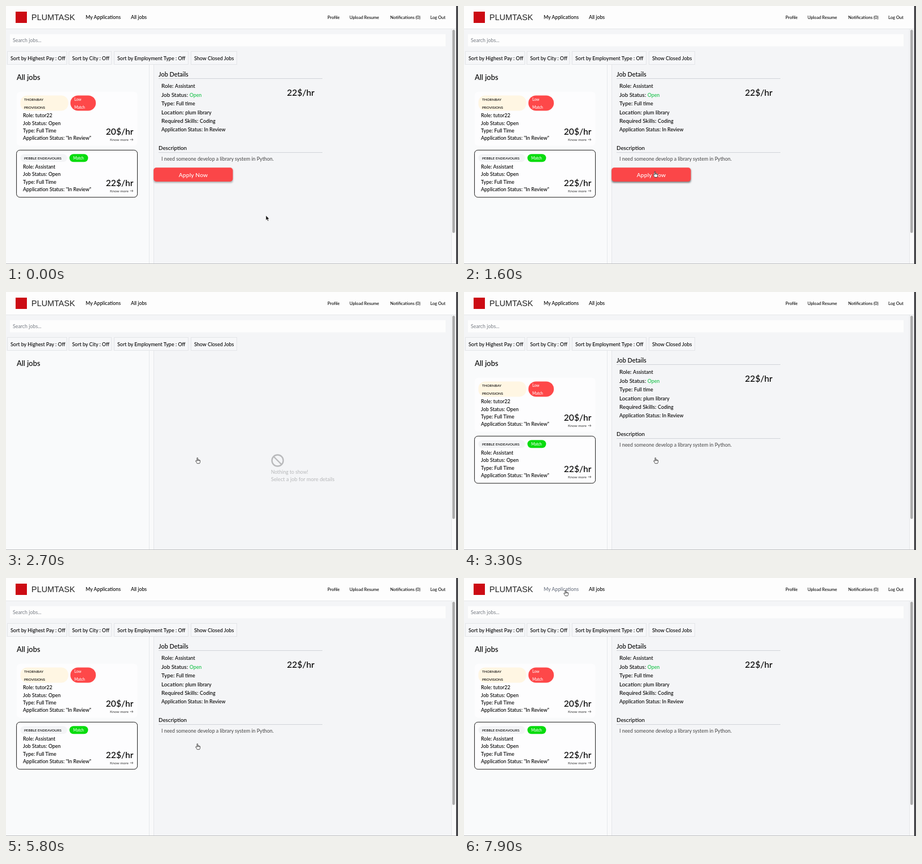
Recreate the animation shown at these times as an HTML page. Size 800x457 px, loop 8000 ms.

```html
<!DOCTYPE html>
<html lang="en">
<head>
<meta charset="utf-8">
<title>Job board</title>
<style>
  html, body { margin: 0; width: 100%; height: 100%; overflow: hidden; background: #f4f5f7; }
  svg { display: block; width: 100%; height: 100%; }
  text { font: 500 8.95px Lato, sans-serif; fill: #000; white-space: pre; }
  .brand { font: 14.5px "Liberation Sans", Arial, sans-serif; fill: #222; }
  .nav text { font-size: 8.75px; }
  .account text { font-size: 7.6px; }
  .title { font-size: 12.9px; }
  .pay { font-size: 15.6px; }
  .tag { font-size: 6.3px; }
  .light { font-size: 6.7px; fill: #fff; }
  .more { font-size: 6.5px; font-weight: 400; fill: #333; }
  .label { font-size: 9.9px; }
  .value { font-size: 8.9px; }
  .apply { font-size: 10.2px; letter-spacing: .2px; fill: #fff; }
  .soft { font-size: 8.85px; font-weight: 400; fill: #444; }
  #empty text { font-weight: 400; fill: #b7b8ba; }
  .rule { stroke: #d1d4d9; }
  .edge { stroke: #e5e7ea; }
</style>
</head>
<body>
<svg viewBox="0 0 800 457" preserveAspectRatio="none">
  <defs>
    <filter id="blur" x="-10%" y="-50%" width="120%" height="200%"><feGaussianBlur stdDeviation="1.6"/></filter>
  </defs>

  <rect width="800" height="457" fill="#f4f5f7"/>
  <rect width="797" height="40" fill="#fdfdfd"/>
  <path class="edge" d="M0 40.5H797"/>
  <rect x="17" y="10" width="20" height="20" fill="#cc0b14"/>
  <text class="brand" x="45" y="25">PLUMTASK</text>
  <g class="nav">
    <text id="applications" x="141" y="23">My Applications</text>
    <text x="221" y="23">All jobs</text>
  </g>
  <g class="account">
    <text x="569" y="22.5">Profile</text>
    <text x="608" y="22.5">Upload Resume</text>
    <text x="680" y="22.5">Notifications (0)</text>
    <text x="751" y="22.5">Log Out</text>
  </g>

  <rect x="7" y="50" width="771" height="21.5" fill="#fdfdfd"/>
  <text class="soft" x="12" y="64" style="fill:#777c84">Search jobs...</text>
  <g id="filters"></g>

  <rect y="104" width="261" height="353" fill="#f9fafb"/>
  <path class="edge" d="M253.5 104V457M261.5 104V457"/>
  <text class="title" x="19" y="131.4">All jobs</text>

  <g id="jobs">
    <rect x="19" y="152" width="213.5" height="95.5" rx="6" fill="#fdfdfe"/>
    <rect x="25.5" y="158.4" width="84.5" height="27" rx="12" fill="#fff6e3"/>
    <text class="tag" x="32" y="168">THORNBAY</text>
    <text class="tag" x="32" y="181.5">PROVISIONS</text>
    <rect x="114" y="158.4" width="45" height="27" rx="13.5" fill="#fe4849"/>
    <text class="tag light" x="121" y="168">Low</text>
    <text class="tag light" x="121" y="181.5">Match</text>

    <rect x="18.6" y="255.3" width="214" height="83.5" rx="6" fill="#fdfdfe" stroke="#1c1c1c"/>
    <rect x="25.5" y="262.3" width="82.5" height="14" rx="7" fill="#f3f4f6"/>
    <text class="tag" x="32" y="272">PEBBLE ENDEAVOURS</text>
    <rect x="112.3" y="262.3" width="33" height="14" rx="7" fill="#08dc0e"/>
    <text class="tag light" x="119" y="272">Match</text>
  </g>

  <g id="details">
    <text style="font-size:10.9px" x="270" y="125">Job Details</text>
    <path class="rule" d="M270 128.5H560M270 259.5H560"/>
    <g id="facts"></g>
    <text x="275" y="222" style="font-size:8.9px">Application Status: In Review</text>
    <text class="pay" x="546" y="158.5" text-anchor="end">22$/hr</text>
    <text style="font-size:9.8px" x="270" y="255">Description</text>
    <text class="soft" x="275" y="274">I need someone develop a library system in Python.</text>
  </g>

  <g id="button">
    <rect id="shadow" x="261.5" y="288" width="140" height="25" rx="4" filter="url(#blur)"/>
    <rect x="261.2" y="286.3" width="140.3" height="24.7" rx="5" fill="#fb4648"/>
    <text class="apply" x="331.5" y="302.5" text-anchor="middle">Apply Now</text>
  </g>

  <g id="empty">
    <g fill="none" stroke="#b9babc" stroke-width="2.4">
      <circle cx="480.7" cy="298.5" r="10"/>
      <path d="M473.7 291.5L487.7 305.5"/>
    </g>
    <text x="469" y="321.5" style="font-size:8.7px">Nothing to show!</text>
    <text x="469" y="335" style="font-size:9.25px">Select a job for more details</text>
  </g>

  <rect x="788" y="41" width="9" height="416" fill="#fafafa"/>
  <path class="edge" d="M788.5 41V457"/>
  <rect x="790" y="42" width="4.6" height="360" rx="2.3" fill="#acacac"/>
  <rect x="796" width="1" height="457" fill="#d4d4d6"/>
  <rect x="797" width="1" height="457" fill="#1d1d1f"/>
  <rect x="798" width="2" height="457" fill="#505054"/>
  <rect y="456" width="797" height="1" fill="#bfc0c2"/>

  <path id="arrow" d="M0 0V8.6L2 6.8L3.4 10L4.9 9.3L3.5 6.3H6.1Z" fill="#111" stroke="#fff" stroke-width=".6"/>
  <g id="hand" fill="#fff" stroke="#222" stroke-width=".8" stroke-linejoin="round">
    <path d="M-1.6 4.8V.4Q-1.6-.5-.8-.5T0 .4V3.3Q.8 2.7 1.4 3.5Q2.2 2.9 2.8 3.8Q4 3.4 4 4.8V6.7Q4 8.2 3 9.7H-1.2Q-2.2 7.8-3.8 5.7Q-4 4.7-3 4.6Q-2.3 4.7-1.6 5.8Z"/>
    <path fill="none" d="M0 3.3V5M1.4 3.5V5M2.8 3.8V5.2"/>
  </g>
</svg>
<script>
const byId = id => document.getElementById(id);
const add = (id, markup) => byId(id).insertAdjacentHTML("beforeend", markup);
const text = (x, y, content, cls = "", extra = "") =>
  `<text class="${cls}" x="${x}" y="${y}" ${extra}>${content}</text>`;

[[3, 105, "Sort by Highest Pay : Off"], [112, 75, "Sort by City : Off"],
 [192, 131, "Sort by Employment Type : Off"], [328, 81, "Show Closed Jobs"]].forEach(([x, width, label]) =>
  add("filters", `<rect x="${x - .5}" y="80.5" width="${width}" height="23" fill="#f6f7f9" stroke="#e3e5e8"/>`
    + text(x + 5, 95.5, label)));

// Shared body of a job card, starting at the baseline of its role.
function addJob(y, role, pay) {
  [`Role: ${role}`, "Job Status: Open", "Type: Full Time", 'Application Status: "In Review"']
    .forEach((line, i) => add("jobs", text(30, y + 13.4 * i, line)));
  add("jobs", text(225.5, y + 30.6, pay, "pay", 'text-anchor="end"')
    + text(184, y + 41.7, "Know more", "more")
    + `<path d="M219.5 ${y + 39.5}h5.5m-2.2-2l2.2 2l-2.2 2" fill="none" stroke="#444" stroke-width=".7"/>`);
}
addJob(197.2, "tutor22", "20$/hr");
addJob(288, "Assistant", "22$/hr");

[["Role", "Assistant"], ["Job Status", "Open", "#19c24a"], ["Type", "Full time"],
 ["Location", "plum library"], ["Required Skills", "Coding"]].forEach(([label, value, color = "#000"], i) =>
  add("facts", text(275, 145 + 15.6 * i,
    `<tspan class="label">${label}: </tspan><tspan class="value" fill="${color}">${value}</tspan>`)));

const LOOP = 8000, EMPTY_FROM = 2600, EMPTY_TO = 2900;
// Pointer stops: time, x, y of the tip.
const stops = [[0, 460, 371], [200, 457, 368], [800, 338, 294], [1000, 337.5, 293], [2000, 339.5, 294],
  [6900, 339.5, 294], [7400, 186, 42], [7600, 180.5, 22], [LOOP, 180.5, 22]];

function pointerAt(t) {
  const i = stops.findIndex(stop => stop[0] > t);
  const [t0, x0, y0] = stops[i - 1], [t1, x1, y1] = stops[i];
  const p = (t - t0) / (t1 - t0), eased = p * p * (3 - 2 * p);
  return [x0 + (x1 - x0) * eased, y0 + (y1 - y0) * eased];
}

const show = (id, visible) => byId(id).style.display = visible ? "" : "none";
const within = ([x, y], left, top, right, bottom) => x >= left && x <= right && y >= top && y <= bottom;

function draw(now) {
  const t = Math.floor(now % LOOP / 100) * 100;
  const point = pointerAt(t);
  const empty = t >= EMPTY_FROM && t < EMPTY_TO;
  const overButton = within(point, 262, 286, 401, 311) && t < 7000;
  const overLink = within(point, 141, 13, 203, 30);
  const overCard = within(point, 19, 152, 232, 247) || within(point, 19, 255, 232, 339);
  const hand = overButton || overLink || overCard;

  show("jobs", !empty);
  show("details", !empty);
  show("empty", empty);
  show("button", t < EMPTY_FROM);
  byId("shadow").setAttribute("opacity", overButton && t >= 1200 ? .5 : .3);
  byId("applications").style.fill = overLink ? "#6b7280" : "";

  show("hand", hand);
  show("arrow", !hand);
  byId(hand ? "hand" : "arrow").setAttribute("transform", `translate(${point})`);
  requestAnimationFrame(draw);
}
requestAnimationFrame(draw);
</script>
</body>
</html>
```
